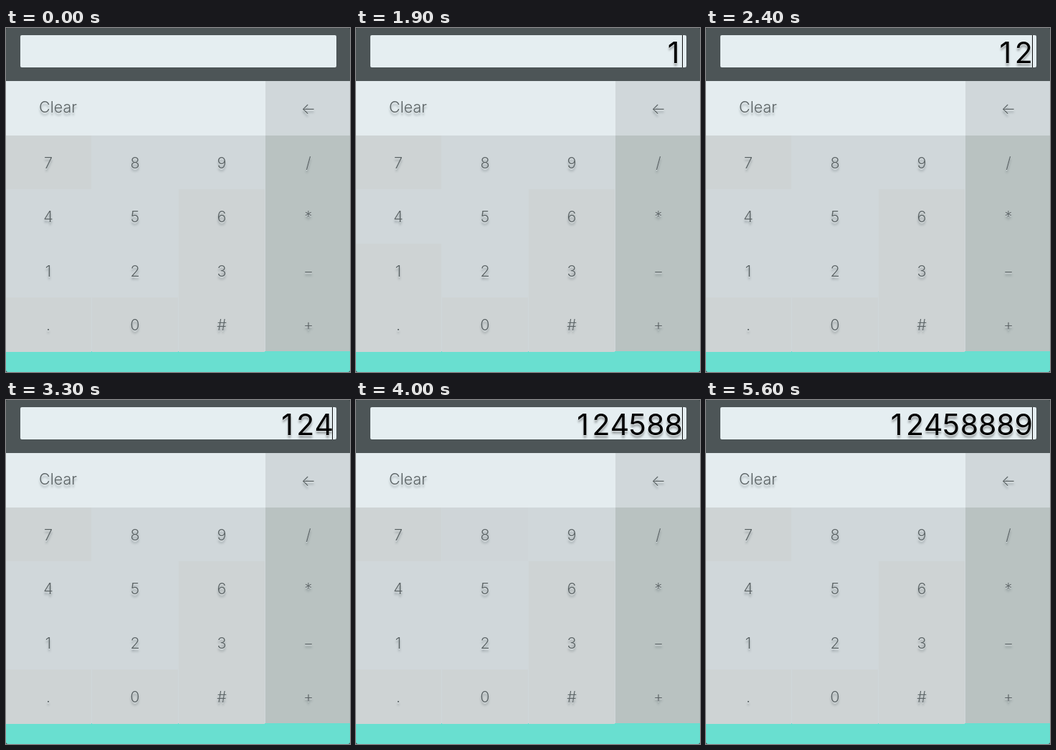
Recreate the animation shown at these times as an HTML page. Size 480x480 px, loop 5.8 s.

```html
<!DOCTYPE html>
<html lang="en">
<head>
<meta charset="utf-8">
<title>Calculator</title>
<style>
  html, body { margin: 0; width: 100%; height: 100%; overflow: hidden; background: #3b4143; }
  #app {
    position: relative; width: 480px; height: 480px; overflow: hidden;
    border-radius: 3px; background: #4d5557;
    font: 300 21.5px/40px Inter, Roboto, sans-serif;
  }
  #app div { position: absolute; }
  .label {
    width: 120px; height: 40px; text-align: center; white-space: nowrap; color: #5b6365;
    text-shadow: 0 1px 0 #dfe5e7, 0 4px 3px rgba(60, 75, 80, .36);
  }
  #screen { left: 20px; top: 10px; width: 441px; height: 45px; border-radius: 2px; background: #e5eef1; }
  #value {
    right: 24.2px; top: 14px; height: 40px; color: #000; white-space: nowrap;
    font-size: 41px; font-weight: 400;
    text-shadow: 0 1px 0 #dfe5e7, 0 4px 3px rgba(0, 0, 0, .32);
  }
  #value span { display: inline-block; width: 25.3px; text-align: center; }
  #caret { left: 455px; top: 10px; width: 1px; height: 45px; background: #111; }
</style>
</head>
<body>
<div id="app">
  <div id="screen"></div>
  <div id="value"></div>
  <div id="caret"></div>
</div>
<script>
const LOOP = 5800, STEP = 100, BLINK = 500;
const COL = 121, ROW = 75.4, LEFT = -1.5, TOP = 150;
const app = document.getElementById('app');
const value = document.getElementById('value');
const caret = document.getElementById('caret');

function add(className, style, text = '') {
  const el = document.createElement('div');
  el.className = className;
  el.textContent = text;
  Object.assign(el.style, style);
  app.insertBefore(el, value);
  return el;
}

function panel(x, y, w, h, background) {
  const px = { left: x, top: y, width: w, height: h };
  for (const k in px) px[k] += 'px';
  return add('', { ...px, background });
}

function label(text, x, y) {
  add('label', { left: x - 60 + 'px', top: y - 20 + 'px' }, text);
}

panel(0, 74, 361.5, 76, '#e4ecef');
panel(361.5, 74, 118.5, 76, '#d0d7da');
panel(0, 150, 361.5, 301, '#d0d7da');
panel(361.5, 150, 118.5, 301, '#b9c2c1');
panel(0, 451, 480, 29, '#69dfd0');

label('Clear', 72.5, 110);
label('←', 422, 111.5);

const hover = {};
['789/', '456*', '123−', '.0#+'].forEach((keys, r) => {
  [...keys].forEach((key, c) => {
    const x = LEFT + c * COL, y = TOP + r * ROW;
    if (c < 3) hover[key] = panel(x, y, COL - 1, ROW, '#ced3d4');
    label(key, x + COL / 2, y + ROW / 2);
  });
});

// time of entry, digit
const typed = [
  [1700, '1'], [2200, '2'], [3000, '4'], [3400, '5'],
  [3700, '8'], [3900, '8'], [4100, '8'], [4300, '9']
];
// key, pointer enters, pointer leaves, strength
const visits = [
  ['1', 1500, 2000, 1], ['2', 2000, 2250, .5], ['4', 2750, 3100, .5],
  ['5', 3250, 3500, .5], ['8', 3550, 4150, .4], ['9', 4200, 4450, .5]
];

const ramp = v => Math.min(1, Math.max(0, v));

let shown = null;
function render(t) {
  const done = typed.filter(([at]) => at <= t);
  const text = done.map(([, digit]) => digit).join('');
  if (text !== shown) {
    value.innerHTML = [...text].map(d => `<span>${d}</span>`).join('');
    shown = text;
  }

  // each entry restarts the blink
  const last = done.length ? done[done.length - 1][0] : Infinity;
  caret.style.opacity = t >= last && Math.floor((t - last) / BLINK) % 2 === 0 ? 1 : 0;

  for (const [key, from, to, strength] of visits) {
    hover[key].style.opacity = strength * Math.min(ramp((t - from) / 200), ramp((to + 150 - t) / 150));
  }
}

const start = performance.now();
function tick() {
  const t = (performance.now() - start) % LOOP;
  render(Math.floor(t / STEP) * STEP);
  requestAnimationFrame(tick);
}
render(0);
tick();
</script>
</body>
</html>
```
